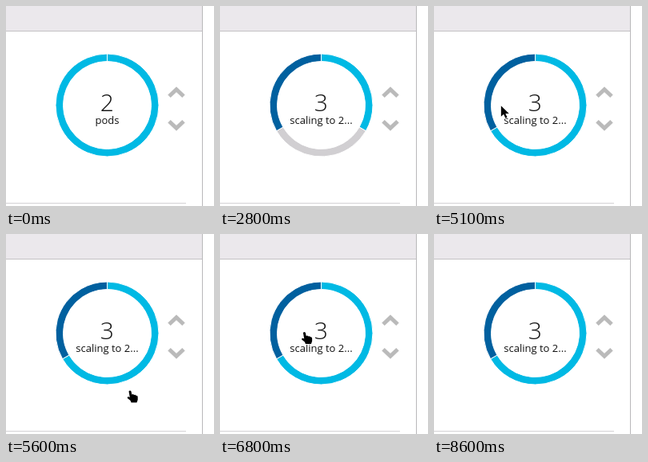
Write an HTML page with a canvas that moves like this. It is 260x251 px and loops after 8.7 s.

```html
<!DOCTYPE html>
<html lang="en">
<head>
<meta charset="utf-8">
<title>Pod scaling</title>
<style>
html, body { margin: 0; width: 100%; height: 100%; overflow: hidden; background: #fff; }
canvas { display: block; }
</style>
</head>
<body>
<canvas id="stage" width="260" height="251"></canvas>
<script>
const ctx = document.getElementById('stage').getContext('2d');
const LOOP = 8700, STEP = 100, TURN = 2 * Math.PI;
const CX = 126.5, CY = 124.5, OUTER = 64.5, INNER = 55;
const CYAN = '#00b9e4', GREY = '#d1cfd2', BLUE = '#00609f';

// Pointer path: time, left, top
const POINTER = [
  [4800, 3, 39], [4900, 3, 39], [5000, 40, 85], [5300, 170, 204], [5400, 170, 204],
  [5500, 166, 206], [5600, 151, 196], [5700, 149, 187], [6100, 149, 187],
  [6300, 150, 184], [7000, 82, 98], [7500, 82, 98], [7600, 62, 62],
  [7700, 62, 62], [7800, 51, 42]
];
const ARROW = new Path2D('M.5 .5V14L3.7 11 6 16 8.2 15 6 10.3H10.4Z');
const HAND = new Path2D('M2.5 1.5Q4-.5 5.5 1.5L6.3 5.5Q8 4.3 9 6Q10.8 5 11.5 6.8' +
  'Q13.6 6.3 13.7 8.5V12L12.5 15.5H5.5L4.5 13L.8 10Q.3 8 2.2 8.2L3.8 9Z');

const ramp = (t, from, to) => Math.min(1, Math.max(0, (t - from) / (to - from)));
const mix = (a, b, k) => a + (b - a) * k;
const ease = k => k < .5 ? 4 * k ** 3 : 1 - 4 * (1 - k) ** 3;

function rect(color, x, y, w, h) {
  ctx.fillStyle = color;
  ctx.fillRect(x, y, w, h);
}

function text(str, x, y, align, color = '#111', font = '13px') {
  ctx.font = font + ' "Open Sans", sans-serif';
  ctx.textAlign = align;
  ctx.fillStyle = color;
  ctx.fillText(str, x, y);
}

function slice(from, to, color, alpha = 1) {
  if (to - from < .001) return;
  const a = from * TURN - TURN / 4, b = to * TURN - TURN / 4;
  ctx.globalAlpha = alpha;
  ctx.beginPath();
  ctx.arc(CX, CY, OUTER, a, b);
  ctx.arc(CX, CY, INNER, b, a, true);
  ctx.closePath();
  ctx.fillStyle = color;
  ctx.fill();
  ctx.strokeStyle = '#fff';
  ctx.lineWidth = 1;
  ctx.stroke();
  ctx.globalAlpha = 1;
}

function chevron(y, dir) {
  ctx.beginPath();
  ctx.moveTo(204, y + 4.3 * dir);
  ctx.lineTo(213, y - 4.3 * dir);
  ctx.lineTo(222, y + 4.3 * dir);
  ctx.strokeStyle = '#bababa';
  ctx.lineWidth = 5;
  ctx.stroke();
}

function page() {
  rect('#fff', 0, 0, 260, 251);
  rect('#ebe8ec', 0, 0, 245, 31);
  rect('#c3c1c4', 0, 31, 245, 1);
  rect('#b9b8ba', 245, 0, 1, 251);
  rect('#d3d2d4', 0, 247, 225, 1);
  chevron(109, 1);
  chevron(149, -1);
}

function donut(t) {
  const scale = ease(ramp(t, 1360, 1700));
  const start = ease(ramp(t, 4260, 4780));
  const running = mix(mix(1, 1 / 3, scale), 2 / 3, start);
  const ending = mix(1, 2 / 3, scale);
  const fadeRunning = ramp(t, 6800, 7000) - ramp(t, 7500, 7600);
  const fadeEnding = ramp(t, 5600, 5700) - ramp(t, 6400, 6600);
  slice(0, running, CYAN, 1 - fadeRunning / 2);
  slice(running, ending, GREY);
  slice(ending, 1, BLUE, 1 - fadeEnding / 2);

  const scaling = t >= 1400;
  text(scaling ? '3' : '2', 126.3, 132, 'center', '#111', '300 30px');
  text(scaling ? 'scaling to 2...' : 'pods', 126.5, 148, 'center');
}

function tooltip(x, width, color, label, count) {
  rect('#2e2e2e', x, 25, width, 31);
  rect(color, x + 10, 36, 10, 10);
  text(label, x + 26.3, 45, 'left', '#fff');
  text(count, x + width - 10, 45, 'right', '#fff');
}

function pointer(t) {
  const i = POINTER.findIndex(p => p[0] >= t);
  if (i < 0 || t < POINTER[0][0]) return;
  const b = POINTER[i], a = POINTER[i - 1] || b;
  const k = a === b ? 1 : ramp(t, a[0], b[0]);
  const shape = t < 5600 ? ARROW : HAND;
  ctx.save();
  ctx.translate(mix(a[1], b[1], k), mix(a[2], b[2], k));
  ctx.lineJoin = 'round';
  ctx.lineWidth = 2;
  ctx.strokeStyle = '#fff';
  ctx.stroke(shape);
  ctx.fillStyle = '#000';
  ctx.fill(shape);
  ctx.restore();
}

function draw() {
  const t = Math.floor(performance.now() % LOOP / STEP) * STEP;
  page();
  donut(t);
  if (t >= 5700 && t < 6500) tooltip(68.5, 114.5, '#22b6de', 'Running', '2');
  if (t >= 6900 && t < 7600) tooltip(57, 138, '#1c6ba3', 'Terminating', '1');
  pointer(t);
  requestAnimationFrame(draw);
}
draw();
</script>
</body>
</html>
```
